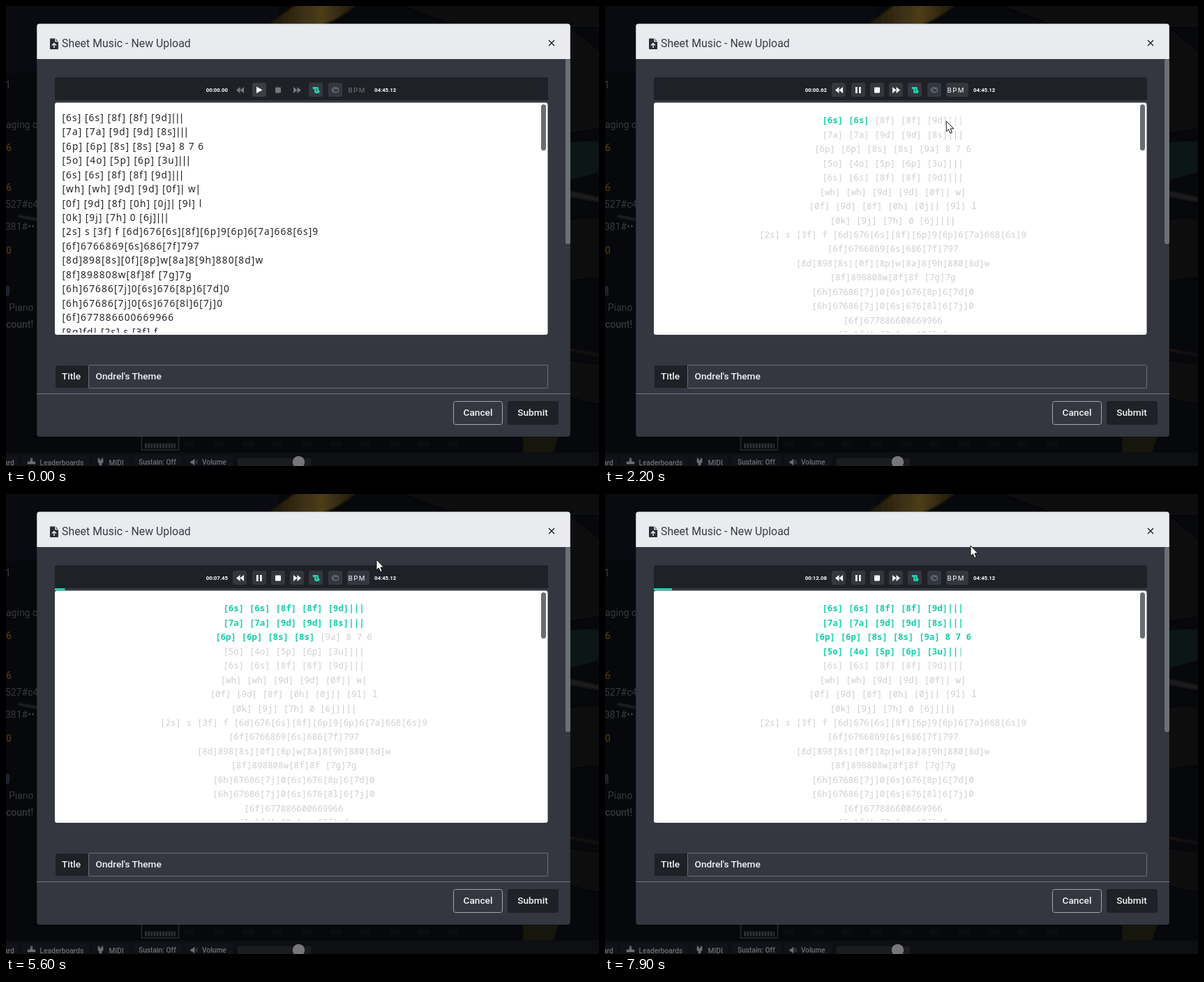
An HTML page that plays this animation: 850x659 px, repeating every 8 s.

```html
<!DOCTYPE html>
<html lang="en">
<head>
<meta charset="utf-8">
<title>Sheet music upload</title>
<style>
  html, body { margin: 0; width: 100%; height: 100%; overflow: hidden; background: #07080b; }
  svg { display: block; width: 850px; height: 659px; font-family: Roboto, sans-serif; }
  text { white-space: pre; }
  .ui { font-size: 13.65px; font-weight: 500; fill: #f2f2f4; }
  .side { font-size: 14px; fill: #37383d; }
  .gold { fill: #46360b; font-weight: 500; }
  .dock { font-size: 10.2px; font-weight: 500; fill: #6d6e72; }
  .clock { font-size: 7.8px; font-weight: 700; fill: #fff; }
  .bpm { font: 400 9.6px Inter, sans-serif; letter-spacing: 1.4px; }
  .edit { font: 13.65px "Noto Sans", "Open Sans", sans-serif; letter-spacing: 1.14px; fill: #222327; }
  .thin { font-family: "DejaVu Sans", sans-serif; }
  .sheet { font: 500 12.5px "Noto Sans Mono", "DejaVu Sans Mono", monospace; text-anchor: middle; }
  .key { fill: #353740; }
  .idle .key { fill: none; }
  .icon { fill: #fff; }
  .idle .icon { fill: #75777e; }
  .idle .main .key { fill: #3b3d47; }
  .idle .main .icon { fill: #fff; }
  .hover .main .key { fill: #1ed3ae; }
  .hover .main .icon { fill: #17181d; }
  .extra { fill: #353740; }
</style>
</head>
<body>
<svg viewBox="0 0 850 659">
  <defs>
    <linearGradient id="brass"><stop stop-color="#17130a"/><stop offset=".6" stop-color="#4d3d18"/><stop offset="1" stop-color="#17130b"/></linearGradient>
    <clipPath id="paper"><rect x="70" y="139" width="697" height="329"/></clipPath>
    <clipPath id="track"><rect x="70" y="134" width="707" height="5"/></clipPath>
    <filter id="soft"><feGaussianBlur stdDeviation="1.5"/></filter>
  </defs>

  <!-- dimmed page -->
  <rect width="850" height="659" fill="#07080b"/>
  <rect width="390" height="96" fill="#0a0b10"/>
  <g filter="url(#soft)">
    <path d="M418 -4H506Q480 18 448 30H372Z" fill="url(#brass)"/>
    <path d="M560 -4L650 30H850V-4Z" fill="#090909"/>
    <path d="M806 30L850 64V175L806 182Z" fill="#09090c"/>
    <path d="M806 196Q828 193 850 194V238L806 250Z" fill="#111216"/>
    <path d="M806 264L850 274V281L806 273Z" fill="#1a1b1f"/>
    <path d="M806 308Q830 300 850 306V388L806 393Z" fill="#0b0c0f"/>
    <path d="M806 492L850 500" stroke="#241e13" stroke-width="2"/>
    <path d="M806 508L850 514V570L806 560Z" fill="#0a0a0a"/>
    <path d="M741 617H792L784 640H741Z" fill="#181208"/>
    <path d="M18 301L44 306" stroke="#45464a" stroke-width="1.5"/>
  </g>
  <g class="side">
    <text x="-1" y="118">1</text>
    <text x="0" y="175">aging cl</text>
    <text class="gold" x="0" y="208">6</text>
    <text class="gold" x="0" y="265">6</text>
    <text x="-1" y="289">527#c4</text>
    <text x="-1" y="321">381#••</text>
    <text class="gold" x="0" y="355">0</text>
    <rect x="-4" y="401" width="9" height="14" rx="2" fill="#20232c"/>
    <text x="4" y="437">Piano</text>
    <text x="0" y="461" font-weight="500">count!</text>
  </g>
  <g fill="none">
    <rect x="194.500" y="611" width="53" height="25" stroke="#2a2b30" stroke-width="1.5"/>
    <path d="M199 630H243" stroke="#2e2f34" stroke-width="7" stroke-dasharray="3 1.2"/>
    <path d="M255 627H655" stroke="#0b0c0f" stroke-width="9" stroke-dasharray="16 26"/>
  </g>
  <rect y="640" width="850" height="19" fill="#0e0f13"/>
  <g class="dock">
    <g fill="#121318">
      <rect y="644" width="18" height="15"/><rect x="23" y="644" width="96" height="15"/>
      <rect x="124" y="644" width="52" height="15"/><rect x="182" y="644" width="70" height="15"/>
      <rect x="257" y="644" width="68" height="15"/>
    </g>
    <text x="-3" y="657.500">ard</text>
    <path d="M31 656H42V653H38V650H35V653H31ZM35 648H38V649H35ZM132 648H134V651H137V648H139V654L137 655V658H134V655L132 654ZM265 652H267L270 649V658L267 655H265ZM272 651V656M274 650V657" stroke="#6d6e72" stroke-width=".6"/>
    <text x="48.500" y="657.500">Leaderboards</text>
    <text x="147.500" y="657.500">MIDI</text>
    <text x="190" y="657">Sustain: Off</text>
    <text x="281" y="657">Volume</text>
    <rect x="332" y="648" width="105" height="11" fill="#1b1c20"/>
    <circle cx="419.500" cy="653.500" r="8.700" fill="#77777a"/>
  </g>

  <!-- dialog -->
  <rect x="44.300" y="25.500" width="764.500" height="591.500" rx="4" fill="#353740"/>
  <path d="M44.300 76V29.500Q44.300 25.500 48 25.500H805Q808.800 25.500 808.800 29.500V76Z" fill="#eaebef"/>
  <path d="M64 46.500H71L75 50.500V61Q75 62 74 62H64Q63 62 63 61V47.500Q63 46.500 64 46.500Z" fill="#2c2e35"/>
  <path d="M71 46.500V50.500H75M69 60V54M66 56.500L69 53.500L72 56.500" fill="none" stroke="#eaebef" stroke-width="1.500"/>
  <text x="80" y="59" font-size="15.800" letter-spacing=".04" fill="#3a3c44">Sheet Music - New Upload</text>
  <path d="M778 49L786 57M786 49L778 57" stroke="#25262b" stroke-width="1.500"/>
  <rect x="802" y="76" width="7" height="265" rx="3" fill="#6d6f77"/>
  <path d="M44 555.500H809" stroke="#74767e"/>

  <rect x="70" y="102" width="707" height="34" rx="3" fill="#1f2127"/>
  <rect x="70" y="135" width="707" height="3.500" fill="#373942"/>
  <rect id="bar" x="66" y="135" width="0" height="3" fill="#1ed3ae" clip-path="url(#track)"/>
  <g id="deck" class="idle">
    <text id="now" class="clock" x="318" y="123" text-anchor="end"></text>
    <g><rect class="key" x="325" y="110" width="20" height="20" rx="3"/><path class="icon" d="M335.500 116V125L330 120.500ZM341 116V125L335.500 120.500Z"/></g>
    <g class="main"><rect class="key" x="353" y="110" width="20" height="20" rx="3"/><path id="toggle" class="icon"/></g>
    <g><rect class="key" x="380" y="110" width="20" height="20" rx="3"/><rect class="icon" x="386" y="116.500" width="8" height="8" rx="1"/></g>
    <g><rect class="key" x="407" y="110" width="20" height="20" rx="3"/><path class="icon" d="M412 116V125L417.500 120.500ZM417.500 116V125L423 120.500Z"/></g>
    <rect class="extra" x="434" y="110" width="20" height="20" rx="3"/>
    <path d="M440 116H446Q448 116 448 118V121H449.500V123Q449.500 125 447 125H444Q442 125 442 123V119H440Q439 117 440 116Z" fill="#1ed3ae"/>
    <path d="M444 119H446M444 121.500H446" stroke="#353740"/>
    <rect class="extra" x="462" y="110" width="20" height="20" rx="3"/>
    <rect x="467.500" y="117" width="9" height="6.500" rx="3" fill="none" stroke="#8b8d94"/>
    <path d="M470 119V121.500M472 118.500H474" stroke="#8b8d94"/>
    <g><rect class="key" x="489" y="110" width="32" height="20" rx="3"/><text class="icon bpm" x="490.500" y="124">BPM</text></g>
    <text class="clock" x="528" y="123">04:45.12</text>
  </g>

  <rect x="70" y="138.500" width="706.500" height="332.500" rx="3" fill="#fff"/>
  <g clip-path="url(#paper)"><g id="edit" class="edit"></g><g id="sheet" class="sheet"></g></g>
  <rect x="767" y="141" width="7" height="66" rx="3.500" fill="#6b6c72"/>

  <path d="M71 515H118V547H71Z" fill="#1f2127"/>
  <rect x="118.500" y="514.500" width="658" height="33" rx="1" fill="none" stroke="#6d6f78"/>
  <g class="ui">
    <text x="80" y="535.300">Title</text>
    <text x="128.500" y="535.300">Ondrel's Theme</text>
    <rect x="641.500" y="566.500" width="70" height="33" rx="3" fill="none" stroke="#a4a5ab"/>
    <text x="676.500" y="587" text-anchor="middle">Cancel</text>
    <rect x="719" y="566" width="73" height="34" rx="3" fill="#1f2127"/>
    <text x="755" y="587" text-anchor="middle">Submit</text>
  </g>

  <g id="cursor" stroke-linejoin="round">
    <path id="arrow" d="M0 0V15L3.300 12L5.700 17.500L8.200 16.400L5.900 11H10.500Z" fill="#fff" stroke="#111"/>
    <path id="hand" d="M-1.500 1.500Q0 -1 1.700 1.500V7Q4 6 4.500 7.500Q7 6.700 7.300 8.500Q10 8 10 10.500V14Q10 17 8 19.500H0Q-2 15.500 -5 12.500Q-5 9.500 -1.500 12Z" fill="#fff" stroke="#111"/>
  </g>
</svg>
<script>
  const LOOP = 8000, CLICK = 1100, TOTAL = 285.12;
  const BEAT = 0.447, FADE = 0.28, PITCH = 20.46;
  const PLAY = 'M359 115.500V125L367.500 120.200Z';
  const PAUSE = 'M359 116H361.700V125H359ZM364 116H366.700V125H364Z';
  const GREY = [207, 207, 207], TEAL = [20, 207, 170];

  const lines = `[6s] [6s] [8f] [8f] [9d]|||
[7a] [7a] [9d] [9d] [8s]|||
[6p] [6p] [8s] [8s] [9a] 8 7 6
[5o] [4o] [5p] [6p] [3u]|||
[6s] [6s] [8f] [8f] [9d]|||
[wh] [wh] [9d] [9d] [0f]| w|
[0f] [9d] [8f] [0h] [0j]| [9l] l
[0k] [9j] [7h] 0 [6j]|||
[2s] s [3f] f [6d]676[6s][8f][6p]9[6p]6[7a]668[6s]9
[6f]6766869[6s]686[7f]797
[8d]898[8s][0f][8p]w[8a]8[9h]880[8d]w
[8f]898808w[8f]8f [7g]7g
[6h]67686[7j]0[6s]676[8p]6[7d]0
[6h]67686[7j]0[6s]676[8l]6[7j]0
[6f]677886600669966
[8g]fd| [2s] s [3f] f`.split('\n');

  // time, then x and y of the pointer tip
  const path = [
    [250, 856, 655], [950, 372, 122], [1850, 372, 122], [2400, 539, 183],
    [4800, 539, 183], [5500, 531, 94], [5700, 531, 94], [6250, 524, 74]
  ];

  const $ = id => document.getElementById(id);
  const add = (parent, tag, attrs, text = '') => {
    const el = document.createElementNS('http://www.w3.org/2000/svg', tag);
    for (const k in attrs) el.setAttribute(k, attrs[k]);
    el.textContent = text;
    return parent.appendChild(el);
  };
  const clamp = v => Math.min(1, Math.max(0, v));

  const tokens = [];
  let due = 0;
  lines.forEach((line, i) => {
    const plain = add($('edit'), 'text', { x: 80.4, y: 164.8 + i * PITCH });
    const row = add($('sheet'), 'text', { x: 412.5, y: 168.3 + i * PITCH });
    const start = due;
    for (const part of line.match(/\[[^\]]*\]|./g)) {
      const rest = part === '|';
      add(plain, 'tspan', rest ? { class: 'thin' } : {}, part);
      const el = add(row, 'tspan', {}, part);
      if (part === ' ') continue;
      tokens.push({ el, due, start, rest });
      due += rest ? BEAT / 2 : BEAT;
    }
  });

  function pointer(ms) {
    const i = path.findIndex(p => p[0] > ms);
    if (i < 0) return path[path.length - 1].slice(1);
    if (i === 0) return [-50, -50];
    const [a, b] = [path[i - 1], path[i]];
    const k = clamp((ms - a[0]) / (b[0] - a[0])), e = k * k * (3 - 2 * k);
    return [a[1] + (b[1] - a[1]) * e, a[2] + (b[2] - a[2]) * e];
  }

  function clock(s) {
    const cs = Math.floor(Math.abs(s) * 100 + 1e-6);
    const pad = v => String(v).padStart(2, '0');
    return (s < 0 ? '-' : '') + pad(Math.floor(cs / 6000)) + ':' + pad(Math.floor(cs / 100) % 60) + '.' + pad(cs % 100);
  }

  function draw(ms) {
    const playing = ms >= CLICK;
    const song = 2.23 + (ms - 3000) * 0.00201;
    const leadIn = playing && song < 0;
    const [x, y] = pointer(ms), shift = leadIn ? 2 : 0;
    const over = x > 325 + shift && x < 521 + shift && y > 110 && y < 130;
    const hover = over && x > 353 + shift && x < 373 + shift;

    $('deck').setAttribute('class', (playing ? '' : 'idle') + (hover ? ' hover' : ''));
    $('deck').setAttribute('transform', `translate(${shift})`);
    $('toggle').setAttribute('d', playing ? PAUSE : PLAY);
    $('now').textContent = clock(playing ? song : 0);
    $('bar').setAttribute('width', !playing ? 0 : leadIn ? 711 : 707 * song / TOTAL);

    $('edit').style.display = playing ? 'none' : '';
    $('sheet').style.display = playing ? '' : 'none';
    for (const t of tokens) {
      const lit = playing && song > t.due ? clamp((song - t.due) / FADE + 0.3) : 0;
      const dim = song > t.start ? 214 : 196;
      const from = t.rest ? [dim, dim, dim] : GREY;
      t.el.style.fill = `rgb(${from.map((c, i) => Math.round(c + (TEAL[i] - c) * lit))})`;
      t.el.style.fontWeight = lit > 0 ? 700 : 500;
    }

    $('cursor').setAttribute('transform', `translate(${x} ${y})`);
    $('arrow').style.display = over ? 'none' : '';
    $('hand').style.display = over ? '' : 'none';
  }

  const begin = performance.now();
  function tick() {
    draw((performance.now() - begin) % LOOP);
    requestAnimationFrame(tick);
  }
  tick();
</script>
</body>
</html>
```
